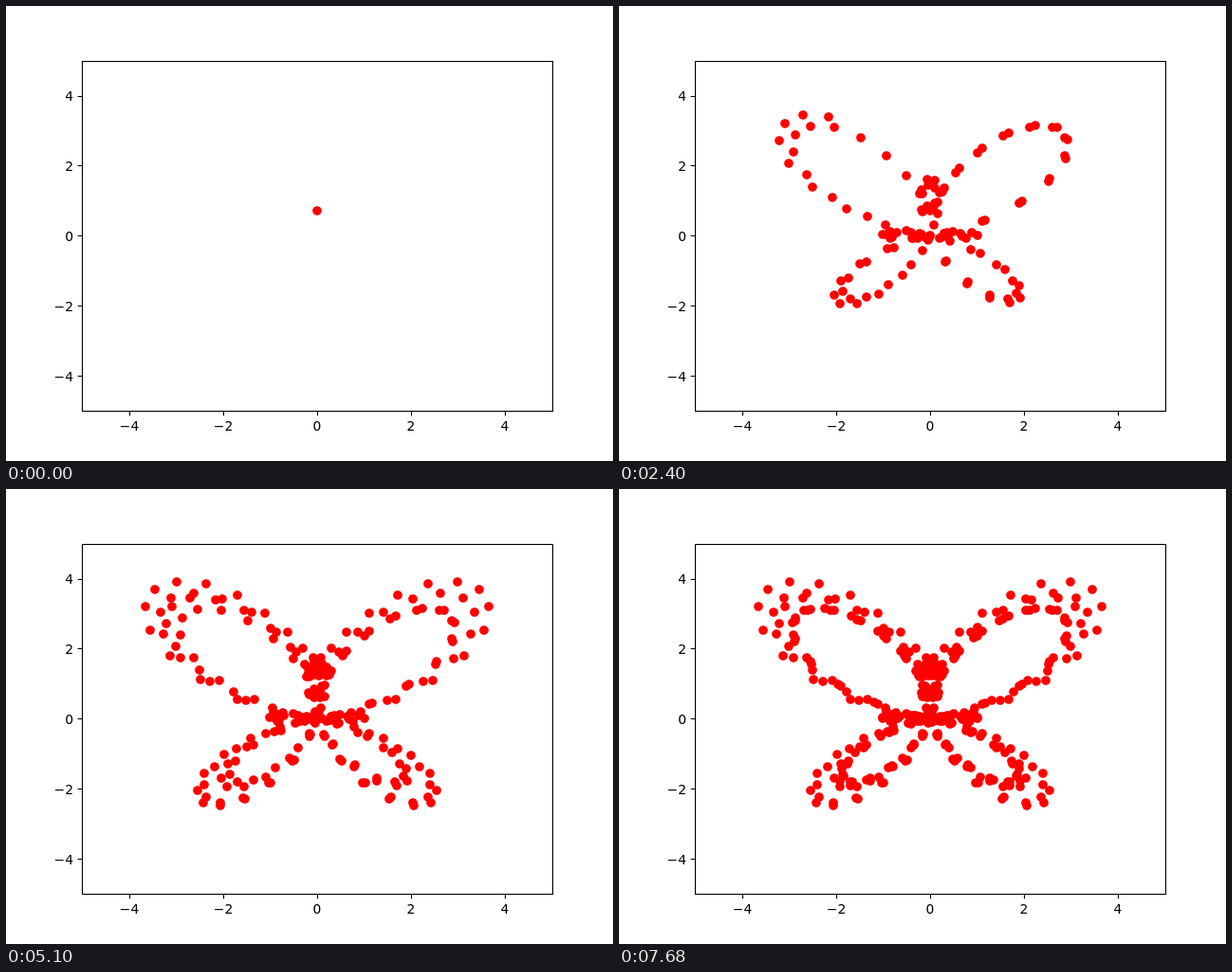
Recreate the animation shown at these times as an HTML page. Size 640 px wide and 480 px high, loop 7.73 s.

```html
<!DOCTYPE html>
<html lang="en">
<head>
<meta charset="utf-8">
<title>Butterfly curve</title>
<style>
  html, body { margin: 0; width: 100%; height: 100%; overflow: hidden; background: #fff; }
  svg { display: block; width: 640px; height: 480px; }
  .axes { fill: none; stroke: #000; stroke-width: 1.11; }
  .labels { font: 13.89px "DejaVu Sans", sans-serif; fill: #000; }
  .dots { fill: #f00; stroke: #f00; stroke-width: 1.39; }
</style>
</head>
<body>
<svg viewBox="0 0 640 480">
  <g class="axes"><rect x="80.5" y="58.5" width="496" height="369"/></g>
  <g class="labels"></g>
  <g class="dots"></g>
</svg>
<script>
  const LOOP = 7730, STEP = 20, HOLD = 10, COUNT = 377;
  // Steps whose dot is hidden by earlier ones are held a little longer.
  const held = new Set([141, 157, 171, 203, 204, 205, 219, 220, 235, 236,
    283, 286, 314, 315, 328, 346, 347, 349, 376]);

  const px = x => Math.round(328 + 49.6 * x);
  const py = y => Math.round(242.4 - 36.96 * y);

  function add(parent, tag, attrs, text = "") {
    const el = document.createElementNS("http://www.w3.org/2000/svg", tag);
    for (const key in attrs) el.setAttribute(key, attrs[key]);
    el.textContent = text;
    return document.querySelector(parent).appendChild(el);
  }

  for (const v of [-4, -2, 0, 2, 4]) {
    const label = String(v).replace("-", "\u2212");
    const x = px(v), y = py(v);
    add(".axes", "path", { d: `M${x + 0.5} 427.5v4.86M80.5 ${y + 0.5}h-4.86` });
    add(".labels", "text", { x, y: 448, "text-anchor": "middle" }, label);
    add(".labels", "text", { x: 71, y: Math.round(247.7 - 36.96 * v), "text-anchor": "end" }, label);
  }

  function butterfly(t) {
    const r = Math.exp(Math.cos(t)) - 2 * Math.cos(4 * t) + Math.sin(t / 12) ** 5;
    return [r * Math.sin(t), r * Math.cos(t)];
  }

  const dots = [];
  let delay = 0;
  for (let n = 0; n < COUNT; n++) {
    if (held.has(n)) delay += HOLD;
    const [x, y] = butterfly(n / 10);
    const el = add(".dots", "circle", { cx: px(x), cy: py(y), r: 4.17, visibility: "hidden" });
    dots.push({ el, start: n * STEP + delay });
  }

  let shown = 0;
  function draw(now) {
    const time = now % LOOP;
    let count = 0;
    while (count < COUNT && dots[count].start <= time) count++;
    for (; shown < count; shown++) dots[shown].el.setAttribute("visibility", "visible");
    while (shown > count) dots[--shown].el.setAttribute("visibility", "hidden");
  }

  const begin = performance.now();
  function tick() {
    draw(performance.now() - begin);
    requestAnimationFrame(tick);
  }
  tick();
</script>
</body>
</html>
```
